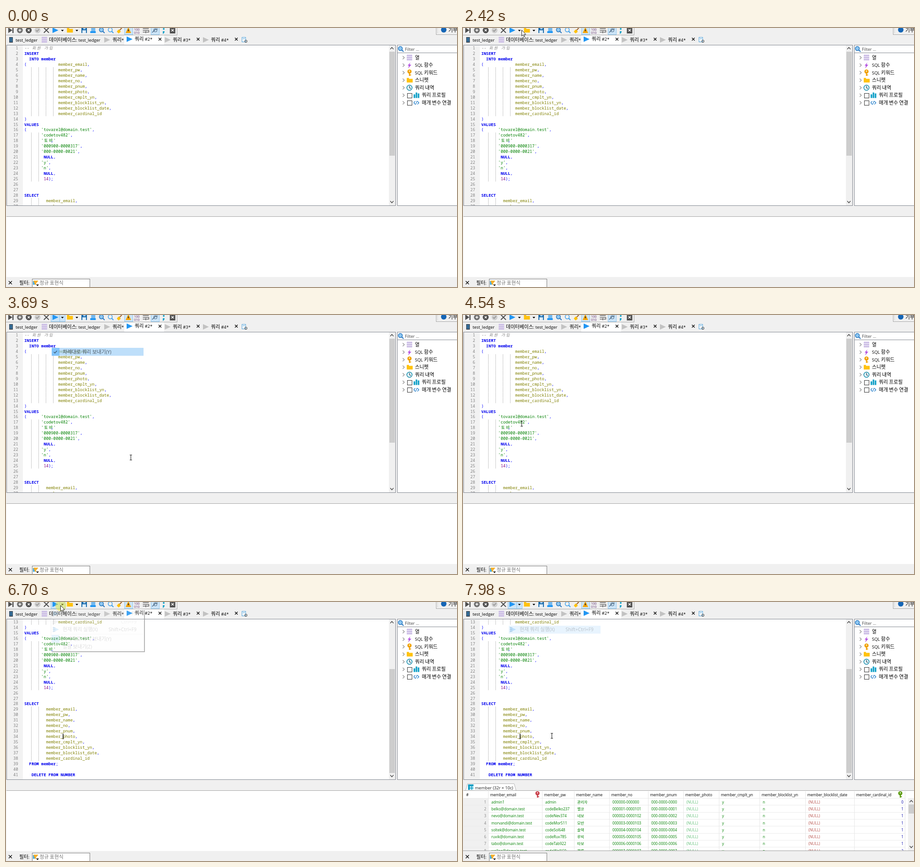
Write an HTML page with a canvas that moves like this. It is 987 px wide and 568 px high and loops after 8 s.

```html
<!DOCTYPE html>
<html lang="ko">
<head>
<meta charset="utf-8">
<title>Query editor</title>
<style>
html, body { margin: 0; width: 987px; height: 568px; overflow: hidden; background: #f0f0f0; }
canvas { display: block; }
</style>
</head>
<body>
<canvas id="stage" width="987" height="568"></canvas>
<script>
const c = document.getElementById('stage').getContext('2d');
const W = 987, H = 568, LOOP = 8000;
const SANS = '"Open Sans", "Noto Sans", sans-serif';
const HANGUL = '"Noto Sans CJK KR", "Noto Sans CJK", sans-serif';
const MONO = '"Noto Sans Mono", "DejaVu Sans Mono", monospace';
const FACE = '#f0f0f0', EDGE = '#828790', BLUE = '#2196f3', HOT = '#cce4f7', CYAN = '#17a2c8';
const GOLD = '#ffc20e', DARK = '#505050', MUTED = '#bdbdbd', THUMB = '#cdcdcd';
const isHangul = s => /[가-힣]/.test(s);

// ---------- drawing helpers ----------
function box(x, y, w, h, color) { c.fillStyle = color; c.fillRect(x, y, w, h); }
function frame(x, y, w, h, color) { c.strokeStyle = color; c.lineWidth = 1; c.strokeRect(x + .5, y + .5, w - 1, h - 1); }
function trace(pts) {
  c.beginPath();
  for (let i = 0; i < pts.length; i += 2) c.lineTo(pts[i], pts[i + 1]);
}
function poly(color, ...pts) { trace(pts); c.closePath(); c.fillStyle = color; c.fill(); }
function line(color, width, ...pts) { trace(pts); c.strokeStyle = color; c.lineWidth = width; c.stroke(); }
function disc(x, y, r, color) { c.beginPath(); c.arc(x, y, r, 0, 7); c.fillStyle = color; c.fill(); }
function ring(x, y, r, color, width) { c.beginPath(); c.arc(x, y, r, 0, 7); c.strokeStyle = color; c.lineWidth = width; c.stroke(); }
function at(x, y, draw, ...args) { c.save(); c.translate(x, y); draw(...args); c.restore(); }
function clip(x, y, w, h, draw) {
  c.save(); c.beginPath(); c.rect(x, y, w, h); c.clip(); draw(); c.restore();
}

// Interface text: Hangul runs are set slightly larger than Latin ones.
function text(s, x, y, { color = '#000', size = 9.4, ko = 10.8, right = false } = {}) {
  const runs = s.match(/[가-힣]+|[^가-힣]+/g).map(run => {
    const font = isHangul(run) ? `350 ${ko}px ${HANGUL}` : `${size}px ${SANS}`;
    c.font = font;
    return { run, font, w: c.measureText(run).width };
  });
  if (right) x -= runs.reduce((sum, r) => sum + r.w, 0);
  c.fillStyle = color;
  for (const r of runs) {
    c.font = r.font;
    c.fillText(r.run, x, y + 3.6);
    x += r.w;
  }
}

// ---------- icons, each centred on the origin ----------
const play = (color = BLUE) => poly(color, -6, -6, 7, 0, -6, 6);
function cross(r, color = '#111', w = 1.4) {
  line(color, w, -r, -r, r, r);
  line(color, w, -r, r, r, -r);
}
function plus(r, color) {
  line(color, 1.6, -r, 0, r, 0);
  line(color, 1.6, 0, -r, 0, r);
}
const tick = color => line(color, 1.4, -3.5, 0, -1, 2.5, 3.5, -2.5);
const chevron = d => line('#404040', 1.3, -3.5, -d, 0, d, 3.5, -d);
const bracket = (d, color) => line(color, 1.2, -d, -3.5, d, 0, -d, 3.5);
const dropArrow = () => poly('#000', -3, -1.5, 3, -1.5, 0, 2);
function skip() { poly(DARK, -6, -6, 3, 0, -6, 6); box(3, -6, 2.5, 12, DARK); }
function folder() { box(-6, -5, 5, 3, GOLD); box(-6, -3, 13, 8, GOLD); }
function stack() { for (let i = -1; i < 2; i++) box(-6, i * 4.5 - 2, 12, 3.6, '#cdbfe6'); }
function floppy() { box(-6, -6, 12, 12, '#1769aa'); box(-4, 0, 8, 6, '#dcecf8'); box(-2, -6, 5, 4, '#9cc9ee'); }
function script() { box(-4, -6, 9, 10, '#73b8ee'); box(-6, 2, 12, 4, BLUE); }
function lens(glass, rim = '#2474bd') {
  line(rim, 2, 2, 2, 6, 6);
  if (glass) disc(-1, -1, 4.4, glass);
  ring(-1, -1, 4.4, rim, 1.5);
}
function broom() { line('#a5672a', 2, 0, 0, 5, -5); poly(GOLD, -2, -2, 3, 3, -2, 7, -6, 3); }
function warning() { poly('#f6a400', 0, -7, 6, 6, -6, 6); box(-1, -2, 2, 4, '#333'); }
function bits() { ['100', '010'].forEach((s, i) => text(s, -7, i * 7 - 3, { size: 7.2, color: '#5b2c6f' })); }
function wrap() {
  for (let i = -1; i < 2; i++) line('#666', 1.5, -7, i * 4, i < 1 ? 6 : -3, i * 4);
  poly('#666', 0, 1, 0, 7, -3, 4);
  line('#666', 1.5, 6, 0, 6, 4, 0, 4);
}
function tool() { line('#52708c', 1.6, -6, 5, 0, -1, 6, -3); ring(1, 0, 3.5, '#52708c', 1.2); }
function semicolon() { disc(0, -3, 1.9, CYAN); poly(CYAN, -2, 2, 2, 2, 1, 6, -2, 8); }
function badge(color, mark) { disc(0, 0, 6.5, color); mark(); }
function closeBox() { box(-6, -6, 12, 13, DARK); cross(2.6, '#fff'); }
function bolt() { poly('#b04be0', 2, -6, -4, 1, -1, 1, -3, 7, 4, -1, 0, -1); }
function key(color) {
  disc(0, -2.5, 4.6, color);
  box(-1.2, 0, 2.6, 7, color);
  box(0, 4, 3.5, 2, color);
  disc(0, -3.5, 1.2, '#fff');
}
function clock() { disc(0, 0, 6.5, '#1489a8'); disc(0, 0, 5, '#e2f6fb'); line('#234', 1.2, 0, -4, 0, 0, 3, 2); }
function bars() { [8, 12, 10].forEach((h, i) => box(i * 4.5 - 6, 6 - h, 3.5, h, CYAN)); }
function tag() {
  c.save(); c.translate(4, 0); bracket(1.6, '#1878c8'); c.restore();
  c.save(); c.translate(-4, 0); bracket(-1.6, '#1878c8'); c.restore();
  line('#1878c8', 1.2, 1.5, -4, -1.5, 4);
}
function server() {
  box(-4, -6, 8, 12, '#3b4652');
  for (let y = -4; y < 5; y += 3) box(-3, y, 6, 1.3, '#2f9bea');
}
function newDoc() {
  box(-6, -6, 9, 11, '#fff'); frame(-6, -6, 9, 11, '#4b9fd8');
  line('#4b9fd8', 1, -4, -2.5, 1, -2.5);
  ring(3, 3, 2.5, DARK, 1.2);
}
function gridIcon() {
  box(-6, -6, 12, 12, '#19a0c4'); box(-2, -2, 8, 8, '#b9e8f5');
  at(2, 2, plus, 4, '#19a0c4');
}
function funnel() { box(-6, -4, 4, 8, '#40a8dc'); poly('#f6b030', -5, -5, 6, -5, 1, 1, 1, 5, -2, 3); at(4, 5, dropArrow); }

// ---------- top area ----------
const PITCH = 19.35;
const tools = [
  { draw: skip },
  { draw: () => badge('#747474', () => plus(3, '#fff')) },
  { draw: () => badge(DARK, () => cross(2.2, '#fff')) },
  { draw: () => badge('#cfcfcf', () => tick('#888')) },
  { draw: () => cross(5.5, DARK, 2) },
  { draw: play, drop: true, run: true },
  { draw: folder, drop: true },
  { draw: floppy }, { draw: script },
  { draw: () => lens('#8fc8f2') },
  { draw: () => lens(null, '#3da0ec') },
  { draw: broom }, { draw: warning, on: true }, { draw: bits }, { draw: wrap },
  { draw: tool, on: true }, { draw: semicolon }, { draw: closeBox }
];

function hotBack(x, w) { box(x, -1, w, 16, HOT); frame(x, -1, w, 16, '#90c8f0'); }

function toolbar(runHot) {
  frame(-1, -1, 376, 17, '#a8a8a8');
  let x = 11;
  for (const t of tools) {
    if (t.on) hotBack(Math.round(x - 9), 19);
    if (t.run && runHot) { hotBack(98, 32); box(117, 0, 1, 14, '#90c8f0'); }
    at(x, 5, () => t.draw());
    if (t.drop) { at(x + 15.7, 5.5, dropArrow); x += 12.3; }
    x += PITCH;
  }
  frame(941, -1, 60, 16, '#a8a8a8');
  for (let y = 1; y < 12; y += 3) box(944, y, 1, 1, '#999');
  disc(958, 4, 6, '#1565b5');
  text('기부', 968, 5);
}

function tabs() {
  box(259, 16, 87, 21, '#fff');
  at(11, 26, server);
  text('test_ledger', 21, 26);
  at(84, 26, stack);
  text('데이터베이스: test_ledger', 94, 26);
  at(221, 26, play, '#c2c2c2');
  text('쿼리*', 233, 26);
  for (let i = 0; i < 3; i++) {
    const x = 270 + i * 83.5, y = i ? 26 : 24.5;
    at(x, y, play, i ? '#c2c2c2' : BLUE);
    text(`쿼리 #${i + 2}*`, x + 11.5, y);
    at(x + 67, 24.5, cross, 3);
  }
  at(522, 26, newDoc);
}

const tree = [
  ['열', stack], ['SQL 함수', bolt], ['SQL 키워드', () => key('#f0a30a')], ['스니펫', folder],
  ['쿼리 내역', clock], ['쿼리 프로필', bars, true], ['매개 변수 연결', tag, true]
];

function sidePanel() {
  box(856, 37, 131, 353, '#fff');
  frame(856, 37, 140, 353, EDGE);
  box(857, 54, 130, 1, EDGE);
  at(864, 46, lens, '#8fc8f2');
  text('Filter ...', 873, 46, { color: '#444', size: 9.2 });
  tree.forEach(([name, icon, checkbox], i) => {
    const y = 65 + i * 16.5, shift = checkbox ? 15 : 0;
    at(870, y, bracket, 1.8, '#8a8a8a');
    if (checkbox) frame(878, Math.round(y - 5), 11, 11, '#333');
    at(883 + shift, y, icon);
    text(name, 895 + shift, y);
  });
}

// ---------- code editor ----------
const LEFT = 40, TOP = 38, CW = 5.3, LH = 11.95;
const columns = Object.entries({
  email: 118, pw: 70, name: 77, no: 85, pnum: 77, photo: 78,
  cmplt_yn: 89, blocklist_yn: 100, blocklist_date: 107, cardinal_id: 111
}).map(([name, width]) => ({ name: 'member_' + name, width }));
const indent = (n, list) => list.map(s => ' '.repeat(n) + s);
const fields = columns.map((col, i) => col.name + (i < 9 ? ',' : ''));
const code = [
  '-- 회원 가입', 'INSERT', '  INTO member',
  '(' + ' '.repeat(13) + fields[0], ...indent(14, fields.slice(1)),
  ')', 'VALUES', "(      'tovarel@domain.test',",
  ...indent(7, ["'codetov482',", "'토바',", "'000900-0000317',", "'000-0000-0021',", ' NULL,', "'y',", "'n',", ' NULL,', ' 14);']),
  '', '', 'SELECT', ...indent(9, fields),
  '  FROM member;', '', '   DELETE FROM NUMBER'
];
const TOKEN = /--.*|'[^']*'|[A-Za-z_]+|\d+|[(),;]/g;

function tokenStyle(tok) {
  if (tok.startsWith('--')) return ['#808080', 'italic '];
  if (tok[0] === "'") return ['#008000', ''];
  if (/^\d/.test(tok)) return ['#800080', ''];
  if (/^([A-Z]+|member)$/.test(tok)) return ['#0000ee', 'bold '];
  return /\w/.test(tok) ? ['#808000', ''] : ['#0000ff', ''];
}

function codeLine(s, y) {
  for (const m of s.matchAll(TOKEN)) {
    const [color, style] = tokenStyle(m[0]);
    let x = LEFT + m.index * CW;
    c.fillStyle = color;
    for (const part of m[0].match(/[가-힣]|[^가-힣]+/g)) {
      const wide = isHangul(part);
      c.font = `${style}8.84px ${wide ? HANGUL : MONO}`;
      c.fillText(part, x + (wide ? 1 : 0), y);
      x += CW * (wide ? 2 : part.length);
    }
  }
}

const lineTop = (n, scroll) => TOP + (n - 1 - scroll) * LH;
const codeSpot = (n, col, scroll) => [LEFT + col * CW, lineTop(n, scroll) + 6];

function editor(scroll, caret) {
  box(1, 37, 852, 353, '#fff');
  clip(2, TOP, 836, 351, () => {
    box(2, TOP, 35, 351, '#f2f2f2');
    code.forEach((s, i) => {
      const y = lineTop(i + 1, scroll);
      // guides every three cells in the leading blanks of indented lines
      const guides = /^ {9,}\w/.test(s) && s[13] === ' ' ? 4 : /^ {7,}\S/.test(s) ? 2 : 0;
      for (let k = 1; k <= guides; k++) box(Math.round(LEFT + 3 * k * CW) - 1, y, 1, LH, '#c9c9c9');
      c.font = `8.84px ${MONO}`;
      c.fillStyle = '#808080';
      c.fillText(String(i + 1).padStart(2), 16, y + 9.2);
      codeLine(s, y + 9.2);
    });
    if (caret) box(LEFT + caret.col * CW - .6, lineTop(caret.line, scroll), 1.5, LH, '#000');
  });
  box(838, TOP, 14, 351, FACE);
  box(839, 52 + scroll * 95 / 12, 12, 228, THUMB);
  at(844.5, 44.5, chevron, -2);
  at(844.5, 381.5, chevron, 2);
  frame(1, 37, 852, 353, EDGE);
}

// ---------- result grid ----------
const users = 'admin1 belko nevo morvandi soltek ruvik tabo wellop'.split(' ');
const shown = '관리자 벨코 네보 모반 솔텍 루빅 타보 웰롭'.split(' ');

function person(i) {
  const user = users[i], code = user[0].toUpperCase() + user.slice(1, i === 1 ? 5 : 3);
  return [
    i ? user + '@domain.test' : user,
    i ? `code${code}${100 + i * 137 % 900}` : 'admin',
    shown[i],
    i ? `00000${i}-000010${i}` : '000000-000000',
    `000-0000-000${i}`, '(NULL)', 'y', 'n', '(NULL)'
  ];
}

function results() {
  const tab = [6, 413, 10, 398.5, 112, 398.5, 116, 413];
  poly('#fff', ...tab);
  line('#b5b5b5', 1, ...tab);
  at(17, 406, gridIcon);
  text('member (32r × 10c)', 26, 407, { size: 9.2, color: '#222' });
  const cell = (s, x, y, color, right) => text(s, x, y, { size: 8.15, ko: 8.1, color, right });
  const rowY = i => 438 + i * 15.3;
  clip(1, 414, 986, 131, () => {
    box(1, 430, 54, 115, FACE);
    users.forEach((_, i) => box(1, Math.round(rowY(i) - 8), 966, 1, '#ebebeb'));
    cell('#', 7, 422);
    users.forEach((_, i) => cell(String(i + 1), 51, rowY(i), '#808080', true));
    let x = 55;
    columns.forEach((col, k) => {
      box(x, 415, 1, 130, '#e6e6e6');
      cell(col.name, x + 4.5, 422);
      users.forEach((_, i) => {
        if (k === 9) return cell(String(i && Math.ceil(i / 6)), 964, rowY(i), '#0000a8', true);
        cell(person(i)[k], x + 7, rowY(i), k === 5 ? '#62bf78' : k === 8 ? '#b8524c' : '#008000');
      });
      x += col.width;
      if (k === 0) at(x - 10, 422, key, '#c9424c');
      if (k === 9) at(x - 10, 422, key, '#5e9c14');
    });
    box(x, 415, 1, 130, '#e6e6e6');
    box(974, 430, 13, 115, FACE);
    box(975, 444, 12, 20, THUMB);
    at(981, 437, chevron, -2);
    at(981, 537, chevron, 2);
  });
  box(0, 545, W, 1, '#a0a0a0');
}

function bottom(hasRows) {
  box(1, 413, W, 134, '#fff');
  box(1, 413, W, 1, '#a5a5a5');
  if (hasRows) results();
  box(0, 546, W, 22, FACE);
  at(9.5, 558.5, cross, 3.5);
  text('필터:', 29, 559.5);
  box(57, 550, 127, 18, '#fff');
  frame(57, 550, 127, 30, '#7a7a7a');
  at(65, 559, funnel);
  text('정규 표현식', 73.5, 559, { color: '#707070' });
}

// ---------- run menu ----------
const MENU = { x: 98, y: 15, w: 205, h: 94 };
const ROW = 17.4;
const items = [
  { name: '실행(V)', keys: 'F9', icon: true },
  { name: '선택 실행(W)', keys: 'Ctrl+F9', icon: true, off: true },
  { name: '현재 쿼리 실행(X)', keys: 'Shift+Ctrl+F9', icon: true },
  { name: '차례대로 쿼리 보내기(Y)', check: true },
  { name: '일괄 보내기(Z)' }
];
const itemY = i => 25.5 + i * ROW + (i > 2 ? 3.3 : 0);

function menuItem(i, hot) {
  const it = items[i], y = itemY(i), top = Math.round(y - ROW / 2);
  const color = it.off ? '#9a9a9a' : '#000';
  if (hot) box(MENU.x + 2, top, 201, ROW, '#91c9f7');
  if (it.check) {
    box(MENU.x + 2, top, 17, ROW, '#56b0fa');
    at(108, y, tick, '#111');
  }
  if (it.icon) {
    at(109, y, play, it.off ? MUTED : BLUE);
    if (i) for (let d = -4; d < 5; d += 4) box(102, y + d - .5, 6, 1.5, it.off ? '#aaa' : '#46627e');
  }
  text(it.name, 124, y, { color, size: 10.2 });
  if (it.keys) text(it.keys, 285.5, y, { color, size: 10.2, right: true });
}

const menus = [{ open: 2650, close: 3540, pick: 3 }, { open: 6670, close: 7690, pick: 2 }];
const FADE_IN = 230, FADE_OUT = 370;

function menu(t, p) {
  const m = menus.find(m => t >= m.open && t < m.close + FADE_OUT);
  if (!m) return;
  const { x, y, w, h } = MENU;
  c.save();
  if (t < m.close) {
    const a = Math.min(1, (t - m.open) / FADE_IN);
    c.globalAlpha = Math.min(1, a * 5);
    line('#8f8f8f', 2, x + 3, y + h, x + w, y + h, x + w, y + 3);
    c.globalAlpha = a;
    box(x, y, w, h, '#f2f2f2');
    frame(x, y, w, h, '#a5a5a5');
    box(x + 23, 70, w - 26, 1, '#d2d2d2');
    items.forEach((_, i) => menuItem(i, Math.abs(p.y - itemY(i)) < ROW / 2));
  } else {
    c.globalAlpha = 1 - (t - m.close) / FADE_OUT;
    menuItem(m.pick, true);
  }
  c.restore();
}

// ---------- pointer ----------
const SCROLL_AT = 5200, RESULTS_AT = 7760;
const carets = [{ from: 4700, line: 17, col: 14 }, { from: 5640, line: 34, col: 16 }];
const runButton = [119, 7], beside = [128, 4];
const moves = [
  { from: 210, to: 990, spot: [133, 22] },
  { from: 1020, to: 1410, spot: [197, 112] },
  { from: 1570, to: 1740, spot: [142, 12] },
  { from: 1900, to: 2400, spot: beside },
  { from: 2430, to: 2600, spot: runButton },
  { from: 2720, to: 3040, spot: [186, itemY(3) + 4] },
  { from: 3520, to: 3860, spot: [358, 535] },
  { from: 3860, to: 4300, spot: [181, 366] },
  { from: 4330, to: 4540, spot: [128, 238] },
  { from: 4540, to: 4680, spot: codeSpot(17, 14, 0) },
  { from: 4800, to: 5130, spot: [125, 313] },
  { from: 5510, to: 5620, spot: codeSpot(34, 16, 12) },
  { from: 6010, to: 6600, spot: runButton },
  { from: 6820, to: 7400, spot: [165, itemY(2)] },
  { from: 7660, to: 7960, spot: [194, 293] }
];
const clicks = [...menus.flatMap(m => [m.open - 30, m.close - 30]), ...carets.map(k => k.from)];

function pointerAt(t) {
  if (t < moves[0].from) return { x: -50, y: -50 };
  let [x, y] = [902, 566];
  for (const { from, to, spot } of moves) {
    if (t < from) break;
    const u = Math.min(1, (t - from) / (to - from)), e = u * u * (3 - 2 * u);
    x += (spot[0] - x) * e;
    y += (spot[1] - y) * e;
  }
  return { x, y };
}

function beam() {
  line('#222', 1.1, 0, -5.5, 0, 5.5);
  for (const d of [-5.5, 5.5]) line('#222', 1.1, -2.5, d, 2.5, d);
}
function arrow() {
  const shape = [0, 0, 0, 13, 3, 10.3, 5, 15, 7, 14.2, 5, 9.7, 9, 9.5, 0, 0];
  poly('#fff', ...shape);
  line('#222', 1, ...shape);
}

function pointer({ x, y }, t, menuOpen) {
  if (clicks.some(k => t >= k && t < k + 130)) disc(x + 1, y + 1, 12, 'rgba(238, 236, 60, .5)');
  const overCode = x > 37 && x < 838 && y > TOP && y < 388;
  at(x + .5, y + .5, overCode && !menuOpen ? beam : arrow);
}

// ---------- scene ----------
// Four wheel notches of three lines each.
const scrollAt = t => 3 * Math.max(0, Math.min(4, 1 + Math.floor((t - SCROLL_AT) / 65)));

function draw(t) {
  const p = pointerAt(t);
  const menuOpen = menus.some(m => t >= m.open && t < m.close);
  const pressed = menus.some(m => t >= m.open && t < m.close + 310);
  const hover = p.x > 98 && p.x < 127 && p.y > 0 && p.y < 15;
  box(0, 0, W, H, FACE);
  toolbar(hover || pressed);
  tabs();
  editor(scrollAt(t), carets.filter(k => t >= k.from).pop());
  sidePanel();
  bottom(t >= RESULTS_AT);
  menu(t, p);
  pointer(p, t, menuOpen);
}

const start = performance.now();
function loop() {
  draw((performance.now() - start) % LOOP);
  requestAnimationFrame(loop);
}
loop();
</script>
</body>
</html>
```
